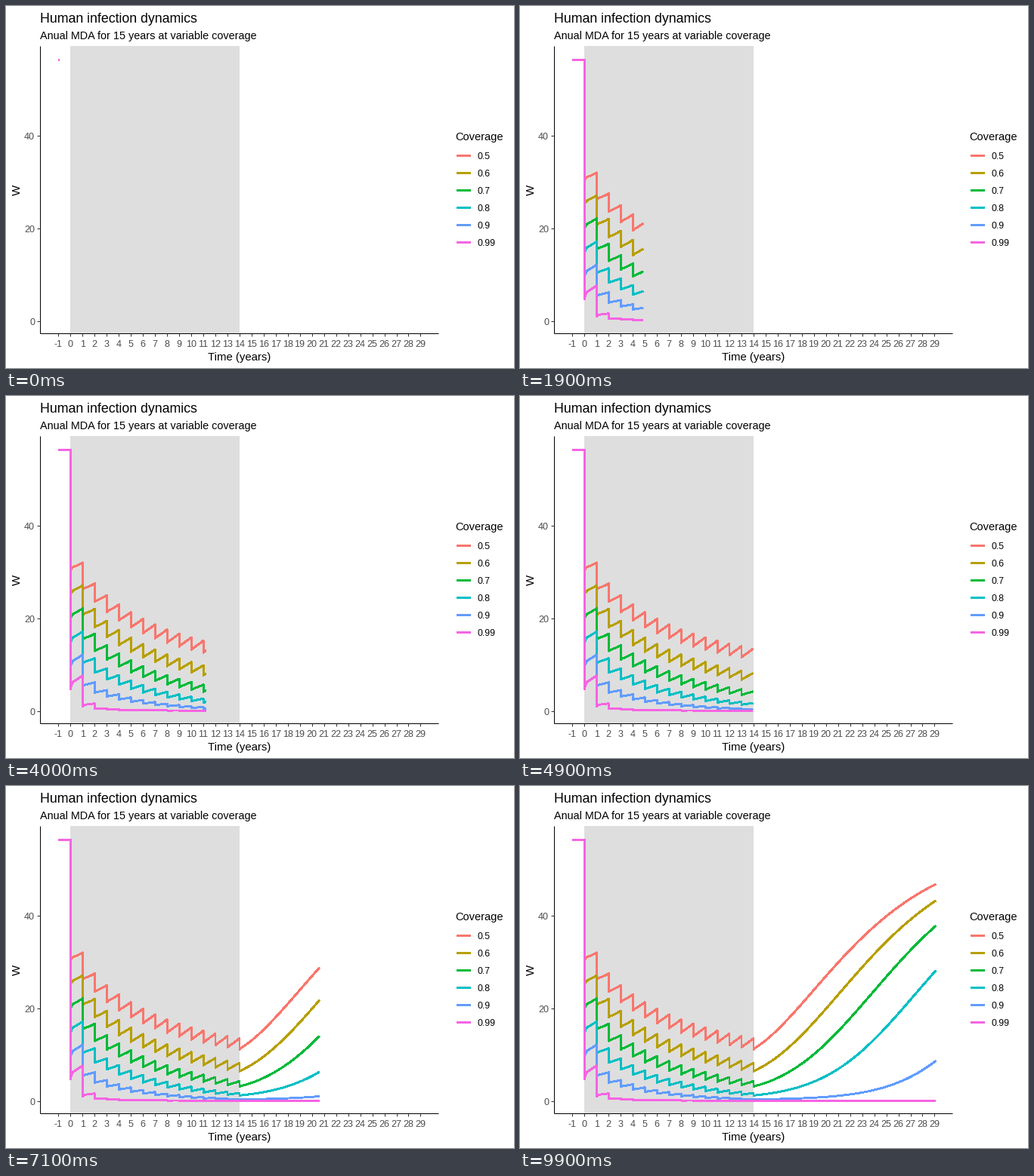
Animation of 672 by 480 pixels, one loop 10 s. Source, as a matplotlib script:

```python
import numpy as np
import matplotlib.pyplot as plt
from matplotlib.animation import FuncAnimation
from matplotlib.patches import Rectangle

W, H, DPI = 672, 480, 100
FRAMES, INTERVAL = 100, 100
PX = 72 / DPI  # points per pixel

AXIS_X, RIGHT, TOP, AXIS_Y = 45.4, 572, 53, 433.6
START, STOP, LEAD = -1, 29, 0.09

COVERAGE = np.array([0.5, 0.6, 0.7, 0.8, 0.9, 0.99])
COLORS = ["#F8766D", "#B79F00", "#00BA38", "#00BFC4", "#619CFF", "#F564E3"]

# worm burden model, rates per year
W0 = 56.26        # burden at equilibrium
DEATH = 0.29
CROWDING = 1.2    # density dependence of transmission
MATING = 0.15     # burden at which half the worms are paired
LAG = 0.1         # memory of the environment
EFFICACY = 0.925
LAST_ROUND = 14
STEPS = 100       # per year


def to_x(t):
    return 85.45 + 15.966 * np.asarray(t)


def to_y(w):
    return 417.5 - 6.15 * np.asarray(w)


def spread(w):
    """Exposure caused by a group with mean burden w."""
    crowd = (1 + CROWDING) / (1 + CROWDING * w / W0)
    return w * crowd * w / (w + MATING)


def simulate():
    """Mean burden of treated and untreated people for every coverage."""
    treated = np.full(len(COVERAGE), W0)
    untreated, exposure = treated.copy(), treated.copy()
    dt = 1 / STEPS

    def mix(a, b):
        return COVERAGE * a + (1 - COVERAGE) * b

    times, burden = [START], [mix(treated, untreated)]
    for i in range(int((STOP + LEAD) * STEPS) + 2):
        times.append(i * dt)
        burden.append(mix(treated, untreated))
        if i % STEPS == 0 and i <= LAST_ROUND * STEPS:
            treated = treated * (1 - EFFICACY)
            times.append(i * dt)
            burden.append(mix(treated, untreated))
        source = mix(spread(treated), spread(untreated))
        treated = treated + dt * DEATH * (exposure - treated)
        untreated = untreated + dt * DEATH * (exposure - untreated)
        exposure = exposure + dt * (source - exposure) / LAG
    return np.array(times), np.array(burden).T


plt.rcParams["font.family"] = "Liberation Sans"
fig = plt.figure(figsize=(W / DPI, H / DPI), dpi=DPI, facecolor="white")
ax = fig.add_axes([0, 0, 1, 1])
ax.set(xlim=(0, W), ylim=(H, 0))
ax.axis("off")


def label(x, y, text, size, color="black", **kw):
    kw.setdefault("va", "baseline")
    ax.text(x, y, text, fontsize=size * PX, color=color, **kw)


def thin(xs, ys, color="black"):
    ax.plot(xs, ys, color=color, lw=PX, zorder=5, solid_capstyle="butt")


def thick(xs, ys, color, z=5):
    # without smoothing every touched pixel is filled, so this paints 3 px
    return ax.plot(xs, ys, color=color, lw=1.9 * PX, zorder=z, snap=False,
                   antialiased=False, solid_capstyle="butt",
                   solid_joinstyle="round")[0]


ax.add_patch(Rectangle((85, TOP), 224, AXIS_Y - TOP, fc="#DEDEDE", lw=0, zorder=1))

thin([AXIS_X, AXIS_X], [TOP, AXIS_Y])
thin([AXIS_X, RIGHT], [AXIS_Y, AXIS_Y])
for year in range(START, STOP + 1):
    x = float(to_x(year))
    thin([x, x], [AXIS_Y + 0.5, AXIS_Y + 4], "#333333")
    label(x - 0.3, 452, str(year), 12.5, "#4D4D4D", ha="center")
for value in (0, 20, 40):
    y = float(to_y(value)) + 0.1
    thin([AXIS_X - 4, AXIS_X - 0.5], [y, y], "#333333")
    label(38, y + 5, str(value), 12.5, "#4D4D4D", ha="right")

label(45, 22, "Human infection dynamics", 17.8)
label(45, 44, "Anual MDA for 15 years at variable coverage", 14.4)
label(309, 470, "Time (years)", 14.9, ha="center")
label(14.7, 243.5, "W", 15, rotation=90, ha="center", va="center")
label(594, 178, "Coverage", 14.6)

times, burdens = simulate()
curves = []
for i, (cover, color) in enumerate(zip(COVERAGE, COLORS)):
    y = 198.4 + 23 * i
    thick([596.1, 614.9], [y, y], color)
    label(624, y + 4.6, f"{cover:g}", 12.3)
    curves.append(thick([], [], color, z=2 + 0.1 * i))


def draw(k):
    tip = START + LEAD + (STOP - START) * k / (FRAMES - 1)
    seen = times < tip
    xs = to_x(np.r_[times[seen], tip])
    for line, w in zip(curves, burdens):
        line.set_data(xs, to_y(np.r_[w[seen], np.interp(tip, times, w)]))
    return curves


anim = FuncAnimation(fig, draw, frames=FRAMES, interval=INTERVAL, repeat=True)
plt.show()
```
